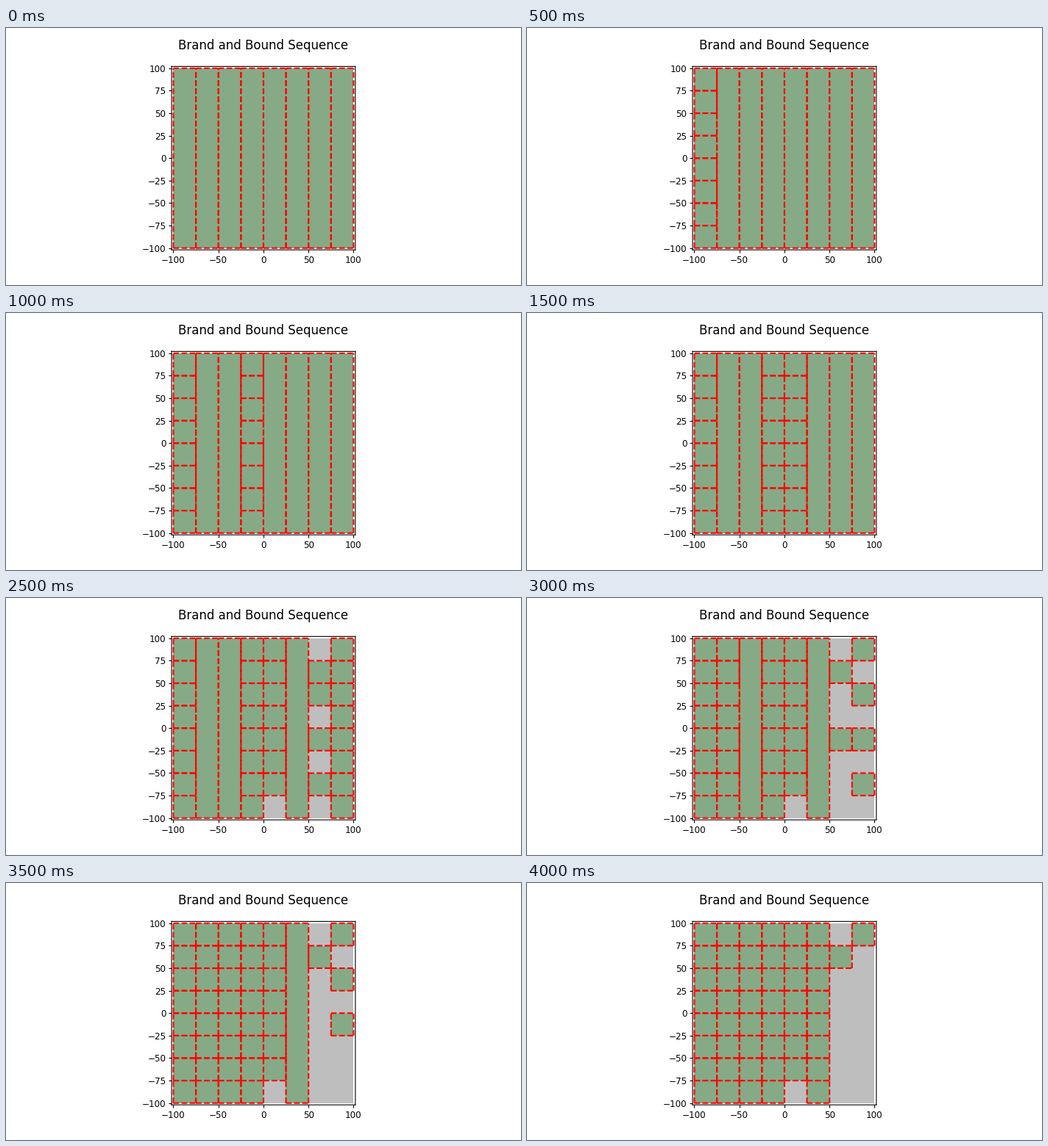
Recreate the animation shown at these times as a matplotlib script. Size 700 px wide and 350 px high, loop 4500 ms.

```python
import matplotlib.pyplot as plt
import numpy as np
from matplotlib.animation import FuncAnimation
from matplotlib.collections import LineCollection
from matplotlib.colors import ListedColormap

# Keep fractional line positions instead of rounding to whole pixels
plt.rcParams["path.snap"] = False

DPI, W, H = 100, 700, 350
N, STEP, LOW, HIGH = 8, 25, -100, 100
SIDE, LEFT, BOTTOM = 249.8, 225.05, 47.85  # plot area in pixels

# Column refined at each step, and cells (column, row) discarded at each step
SPLITS = [None, 0, 3, 4, 6, 7, 1, 2, 5]
PRUNED = {
    4: [(4, 0)],
    5: [(6, 0), (6, 2), (6, 4), (6, 7)],
    6: [(6, 1), (6, 5), (7, 0), (7, 2), (7, 4), (7, 6)],
    7: [(6, 3), (7, 1)],
    8: [(7, 3), (7, 5)],
}


def box_edges(col, bottom, top):
    """Four edges, each running left to right or bottom to top."""
    left = LOW + col * STEP
    right = left + STEP
    return [
        [(left, bottom), (right, bottom)],
        [(left, top), (right, top)],
        [(left, bottom), (left, top)],
        [(right, bottom), (right, top)],
    ]


def state(step):
    split = set(SPLITS[1:step + 1])
    active = np.ones((N, N))
    for k in range(step + 1):
        for col, row in PRUNED.get(k, []):
            active[row, col] = 0
    edges = []
    for col in range(N):
        if col not in split:
            edges += box_edges(col, LOW, HIGH)
            continue
        for row in range(N):
            if active[row, col]:
                bottom = LOW + row * STEP
                edges += box_edges(col, bottom, bottom + STEP)
    return active, edges


fig = plt.figure(figsize=(W / DPI, H / DPI), dpi=DPI, facecolor="white")
fig.text(349.5 / W, 321 / H, "Brand and Bound Sequence", fontsize=12,
         ha="center", va="baseline")

ax = fig.add_axes([LEFT / W, BOTTOM / H, SIDE / W, SIDE / H])
cells = ax.imshow(np.ones((N, N)), extent=(LOW, HIGH, LOW, HIGH),
                  origin="lower", aspect="auto", interpolation="nearest",
                  cmap=ListedColormap(["#bebebe", "#86aa85"]), vmin=0, vmax=1)
lines = LineCollection([], colors="red", linewidths=1.5, linestyles="dashed")
lines.set_snap(False)
ax.add_collection(lines)

ax.set_xlim(-102, 102)
ax.set_ylim(-102, 102)
ax.set_xticks(range(LOW, HIGH + 1, 50))
ax.set_yticks(range(LOW, HIGH + 1, STEP))
ax.tick_params(labelsize=8.64, length=2.8)
ax.tick_params(axis="x", pad=3)
ax.tick_params(axis="y", pad=2.6)


def draw(step):
    active, edges = state(step)
    cells.set_data(active)
    lines.set_segments(edges)
    return cells, lines


anim = FuncAnimation(fig, draw, frames=len(SPLITS), interval=500,
                     init_func=lambda: draw(0), repeat=True, repeat_delay=0)
plt.show()
```
